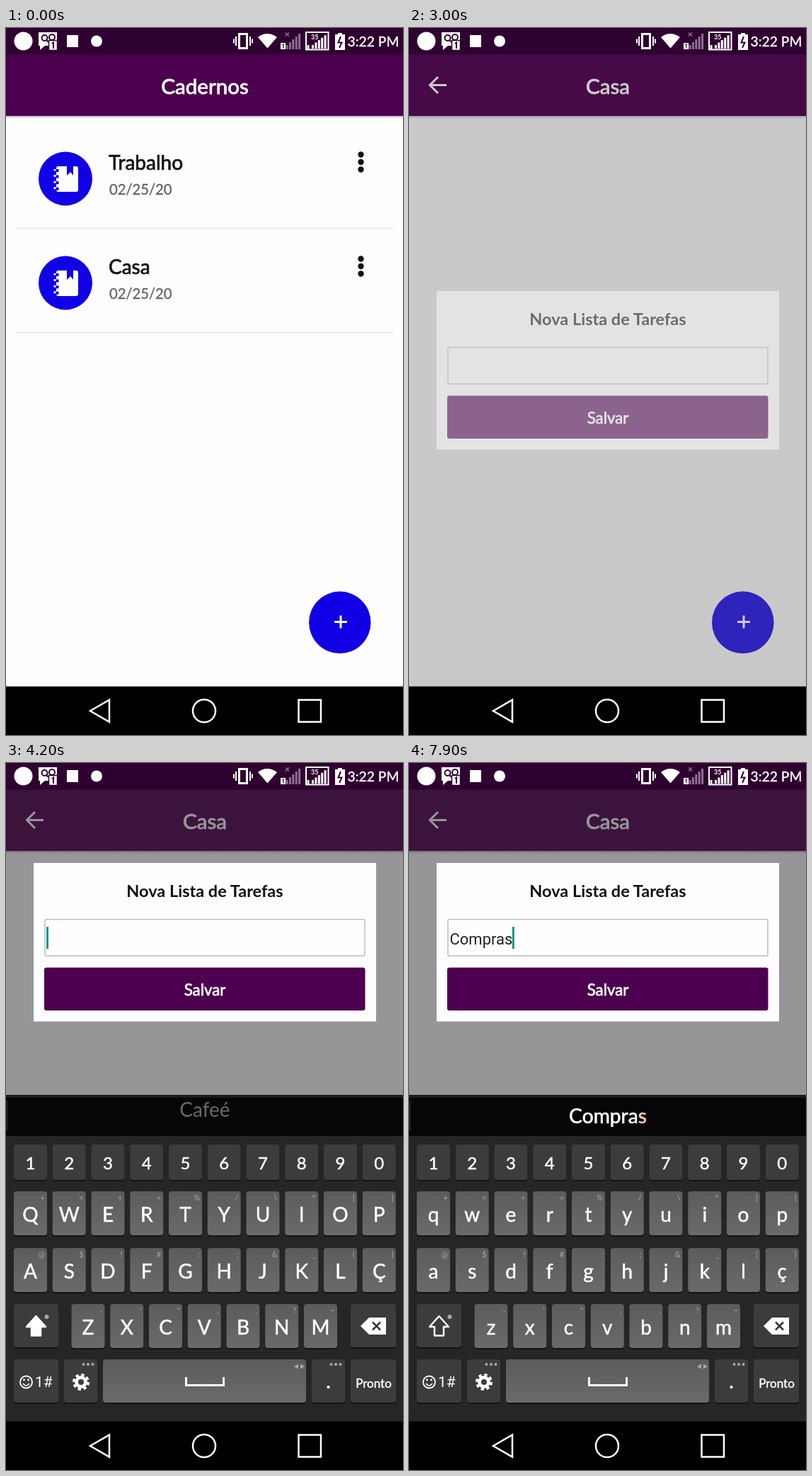
Animation, 561 px wide and 997 px high, one loop 8 s. Source, as an HTML page:

```html
<!DOCTYPE html>
<html lang="pt">
<head>
<meta charset="utf-8">
<title>Cadernos</title>
<style>
html, body { margin: 0; width: 100%; height: 100%; overflow: hidden; background: #000; }
svg { display: block; width: 100%; height: 100%; }
text { font-family: Lato, sans-serif; white-space: pre; }
.mid { text-anchor: middle; }
.line { fill: none; stroke: #fff; stroke-width: 3; }
.head { font-size: 29.6px; fill: #fff; stroke: #fff; stroke-width: .9px; }
.name { font-size: 28px; fill: #111; stroke: #111; stroke-width: .7px; }
.date { font-size: 20.2px; fill: #666; stroke: #666; stroke-width: .4px; }
.hint { font-size: 11px; fill: #a9a7a9; text-anchor: end; }
.key { font-size: 28px; fill: #fff; stroke: #fff; stroke-width: .5px; text-anchor: middle; }
.num { font-size: 24px; }
.field { font: 22px Roboto, sans-serif; fill: #222; }

.anim { animation: 8s linear infinite both; }
#page { animation-name: page; }
#dim { animation-name: dim; }
#modal { animation-name: dim, lift; animation-duration: 8s; animation-timing-function: linear, step-end; }
#board { animation-name: board; }
#guess { animation-name: guess; }
#titleA { animation-name: titleOut; }
#titleB { animation-name: titleIn; }
@keyframes page {
  0%, 23.75% { opacity: 0; transform: translateY(70px); animation-timing-function: ease-out; }
  26.25%, 100% { opacity: 1; transform: none; }
}
@keyframes dim {
  0%, 36.25% { opacity: 0; }
  38.75%, 100% { opacity: 1; }
}
@keyframes lift {
  0% { transform: none; }
  47.5%, 100% { transform: translateY(-230px); }
}
@keyframes board {
  0%, 46.5% { transform: translateY(461px); animation-timing-function: ease-out; }
  49.5%, 100% { transform: none; }
}
@keyframes guess {
  0%, 50% { opacity: 1; transform: translateY(9px); }
  55%, 100% { opacity: 0; transform: translateY(-9px); }
}
@keyframes titleOut { 0%, 23.75% { opacity: 1; } 26%, 100% { opacity: 0; } }
@keyframes titleIn { 0%, 23.75% { opacity: 0; } 26.25%, 100% { opacity: 1; } }
</style>
</head>
<body>
<svg viewBox="0 0 561 997" preserveAspectRatio="none">
  <defs>
    <linearGradient id="shade" x2="0" y2="1">
      <stop stop-color="#c4b9c5"/><stop offset="1" stop-color="#fefefe"/>
    </linearGradient>
    <linearGradient id="cap" x2="0" y2="1">
      <stop stop-color="#5d5c5d"/><stop offset="1" stop-color="#6b6a6b"/>
    </linearGradient>
    <g id="row">
      <circle cx="84" cy="212.5" r="38" fill="#1100e6"/>
      <path fill="#fff" d="M74 195H86V208L91 203L95 208V195H99Q102 195 102 198V228Q102 231 99 231H74Q71 231 71 228V198Q71 195 74 195Z"/>
      <path d="M72.500 199V229" stroke="#1100e6" stroke-width="4" stroke-dasharray="4 4.600"/>
      <path d="M69 199V229" stroke="#fff" stroke-width="3" stroke-dasharray="3 5.600" stroke-dashoffset=".5"/>
      <g fill="#111"><circle cx="501.500" cy="178.500" r="4.200"/><circle cx="501.500" cy="189" r="4.200"/><circle cx="501.500" cy="199.500" r="4.200"/></g>
      <path d="M15 282.500H547" stroke="#ebe9ec" stroke-width="2"/>
      <text class="date" x="146" y="235">02/25/20</text>
    </g>
    <path id="plus" d="M464 837.500H482M473 828.500V846.500"/>
  </defs>

  <rect y="37" width="561" height="892" fill="#fefefe"/>
  <use href="#row"/><text class="name" x="145" y="200">Trabalho</text>
  <use href="#row" y="147"/><text class="name" x="145" y="347">Casa</text>

  <rect id="page" class="anim" y="124" width="561" height="875" fill="#fefefe"/>
  <circle cx="471.800" cy="838.300" r="43.700" fill="#1100e6"/>
  <use href="#plus" class="line"/>

  <rect y="124" width="561" height="4" fill="url(#shade)"/>
  <rect y="37" width="561" height="87" fill="#4d004f"/>
  <text id="titleA" class="head mid anim" x="281" y="93">Cadernos</text>
  <g id="titleB" class="anim">
    <text class="head mid" x="281" y="93">Casa</text>
    <path class="line" d="M53 80.500H30M41 69L29.500 80.500L41 92"/>
  </g>

  <g id="dim" class="anim">
    <rect y="37" width="561" height="892" fill="#2c282c" fill-opacity=".49"/>
    <circle cx="471.800" cy="838.300" r="43.700" fill="#4d4791"/>
    <use href="#plus" fill="none" stroke="#9b98a8" stroke-width="3"/>
  </g>

  <g id="modal" class="anim">
    <rect x="39" y="371" width="484" height="223.500" fill="#fefefe"/>
    <text class="mid" x="281" y="419" font-size="23.500" font-weight="700" fill="#111">Nova Lista de Tarefas</text>
    <rect x="55" y="450.500" width="452" height="51.500" rx="2" fill="#fefefe" stroke="#bebbc2" stroke-width="1.500"/>
    <text id="typed" class="field" x="57.500" y="485.500"></text>
    <rect id="caret" x="57" y="461" width="3" height="31" fill="#0b9688"/>
    <rect x="54" y="518.500" width="453.500" height="60.500" rx="3" fill="#4d004f"/>
    <text class="mid" x="281" y="557.500" font-size="22.300" fill="#fff" stroke="#fff" stroke-width=".7">Salvar</text>
  </g>

  <g id="board" class="anim">
    <rect y="468" width="561" height="461" fill="#272527"/>
    <rect y="468" width="561" height="58" fill="#060507"/>
    <rect y="468" width="561" height="4" fill="#1c1b1c"/>
    <rect y="476" width="2.500" height="42" fill="#222"/>
    <text id="guess" class="mid anim" x="281" y="499" font-size="28" fill="#e8e8e8" fill-opacity=".9">Cafeé</text>
    <text id="word" class="mid" x="281" y="508" font-size="28.200" fill="#fff" stroke="#fff" stroke-width=".6"></text>
    <g id="keys"></g>
    <path id="shift" stroke="#fff" stroke-width="2.500" stroke-linejoin="round" d="M42.500 780L56 795H49V807.500H36V795H29Z"/>
    <circle cx="57.500" cy="781" r="3" fill="#aaa"/>
    <path fill="#fff" d="M501 794L513 782H537V806H513Z"/>
    <path d="M518 788.500L529 799.500M529 788.500L518 799.500" stroke="#333" stroke-width="2.500"/>
    <circle class="line" cx="28.500" cy="873" r="8.500" style="stroke-width:1.800"/>
    <path class="line" d="M24 875Q28.500 881 33 875" style="stroke-width:1.600"/>
    <g fill="#fff"><circle cx="25.500" cy="870" r="1.400"/><circle cx="31.500" cy="870" r="1.400"/></g>
    <text x="41" y="880" style="font:21px Roboto,sans-serif" fill="#fff">1#</text>
    <circle class="line" cx="106" cy="873" r="6.500" style="stroke-width:5"/>
    <circle class="line" cx="106" cy="873" r="10" style="stroke-width:4;stroke-dasharray:4.200 3.654"/>
    <path class="line" d="M254.500 866V877.500H307.500V866"/>
    <path fill="#aaa" d="M407 851L413 847.500V854.500ZM422 851L416 847.500V854.500Z"/>
    <g stroke="#aaa" stroke-width="4" stroke-linecap="round" stroke-dasharray="0 6.500">
      <path d="M109.500 848H123M459.500 848H473"/>
    </g>
    <text class="key" x="455.500" y="882">.</text>
    <text class="mid" x="519.500" y="881" font-size="17" fill="#fff" stroke="#fff" stroke-width=".4">Pronto</text>
  </g>

  <rect width="561" height="37.500" fill="#2f0130"/>
  <g fill="#fff">
    <circle cx="24.500" cy="18.500" r="13"/>
    <path d="M46 6H72V25H55L48 31V25H46Z"/>
    <rect x="86" y="10" width="16" height="17"/>
    <circle cx="128" cy="18.500" r="8"/>
    <path d="M356 13Q369 3 383 13L369.500 28.500Z"/>
    <path d="M465 9H469V7H475V9H479V31H465Z"/>
    <rect x="388" y="21" width="7" height="9"/>
    <text x="482.500" y="26" font-size="19.300" stroke="#fff" stroke-width=".4">3:22 PM</text>
    <text x="431" y="16" font-size="9" font-weight="700">35</text>
  </g>
  <g fill="none" stroke="#2f0130" stroke-width="2">
    <circle cx="54.500" cy="14" r="4"/><circle cx="65" cy="13" r="4"/><path d="M57 17L60 20"/>
    <rect x="60.500" y="17.500" width="12" height="14" fill="#fff" stroke-width="1.500"/>
    <path d="M65 22L67 20.500V29"/>
    <path d="M473 12L469.500 20.500H474.500L471 28"/>
    <path d="M390.500 24L392 23V28.500" stroke-width="1.200"/>
  </g>
  <g fill="none" stroke="#fff" stroke-width="2">
    <rect x="329.500" y="8.500" width="11" height="20" stroke-width="3"/>
    <path d="M325 12V25M345 12V25M322 15.500V21.500M348 15.500V21.500"/>
    <rect x="424" y="6" width="31.500" height="24.500"/>
    <path d="M395 6.500L400 11.500M400 6.500L395 11.500" stroke="#8d6f8e" stroke-width="1.500"/>
    <path d="M427 24V30" stroke-width="3"/>
  </g>
  <g id="bars"></g>

  <rect y="928.500" width="561" height="69"/>
  <g class="line" style="stroke-width:2.500">
    <path d="M119 963L146 947.500V978.500Z"/>
    <circle cx="280" cy="963" r="16"/>
    <rect x="413.500" y="947.500" width="31.500" height="31"/>
  </g>
</svg>
<script>
const LOOP = 8000;
const WORD = 'Compras';
const TYPED_AT = [4900, 5200, 5500, 5900, 6350, 6600, 7500];
const FOCUS_AT = 3800;
const el = id => document.getElementById(id);

function add(parent, tag, attrs, text = '') {
  const node = document.createElementNS('http://www.w3.org/2000/svg', tag);
  for (const k in attrs) node.setAttribute(k, attrs[k]);
  node.textContent = text;
  return parent.appendChild(node);
}

for (let i = 0; i < 5; i++) {
  const h = 6 + i * 4;
  add(el('bars'), 'rect', { x: 395.5 + i * 4.4, y: 30 - h, width: 3, height: h, fill: '#8d6f8e' });
  add(el('bars'), 'rect', { x: 432 + i * 4.4, y: 29 - h * .85, width: 3, height: h * .85, fill: '#fff' });
}

const keys = el('keys'), caps = {}, labels = [];

function keyCap(x, y, w, h, fill) {
  add(keys, 'rect', { x, y: y + 2, width: w, height: h, rx: 4, fill: '#151415' });
  return add(keys, 'rect', { x, y, width: w, height: h, rx: 4, fill });
}

function keyRow(chars, hints, x0, y) {
  [...chars].forEach((c, i) => {
    const x = x0 + i * 54.75;
    caps[c] = keyCap(x, y, 47, 62, 'url(#cap)');
    labels.push(add(keys, 'text', { class: 'key', x: x + 23.5, y: y + 43 }, c));
    add(keys, 'text', { class: 'hint', x: x + 44, y: y + 13 }, hints[i]);
  });
}

[...'1234567890'].forEach((c, i) => {
  const x = 11 + i * 54.75;
  keyCap(x, 538, 47, 50, '#3d3c3d');
  add(keys, 'text', { class: 'key num', x: x + 23.5, y: 573 }, c);
});
keyRow('qwertyuiop', '+×÷=%/\\^[]', 11, 604);
keyRow('asdfghjklç', '@$!#:;&_()', 11, 684);
keyRow('zxcvbnm', '-\'",.?~', 92.5, 763);
for (const [x, y, w] of [[11, 763, 63], [487, 763, 64], [11, 841, 63], [82, 841, 47], [432, 841, 47], [487, 841, 64]])
  keyCap(x, y, w, 61, '#3d3c3d');
keyCap(137, 841, 287, 61, 'url(#cap)');

let shown = -1;

function showText(count) {
  if (count === shown) return;
  shown = count;
  const text = WORD.slice(0, count);
  el('typed').textContent = text;
  el('caret').setAttribute('x', 57 + (count ? el('typed').getComputedTextLength() : 0));
  el('word').textContent = text.slice(0, -1);
  add(el('word'), 'tspan', { fill: '#f3d3a4', stroke: '#f3d3a4' }, text.slice(-1));
  for (const label of labels) {
    const c = label.textContent;
    label.textContent = count ? c.toLowerCase() : c.toUpperCase();
  }
  el('shift').setAttribute('fill', count ? 'none' : '#fff');
}

function draw(t) {
  const count = TYPED_AT.filter(at => t >= at).length;
  showText(count);
  const since = t - (count ? TYPED_AT[count - 1] : FOCUS_AT);
  const caretOn = since >= 0 && since % 1000 < 500;
  el('caret').setAttribute('opacity', caretOn ? 1 : 0);
  for (const c in caps) {
    const down = TYPED_AT.some((at, i) => WORD[i].toLowerCase() === c && t >= at - 120 && t < at + 30);
    caps[c].setAttribute('fill', down ? '#a3a2a3' : 'url(#cap)');
  }
}

let start;
function tick(now) {
  start ??= now;
  draw((now - start) % LOOP);
  requestAnimationFrame(tick);
}
draw(0);
requestAnimationFrame(tick);
</script>
</body>
</html>
```
